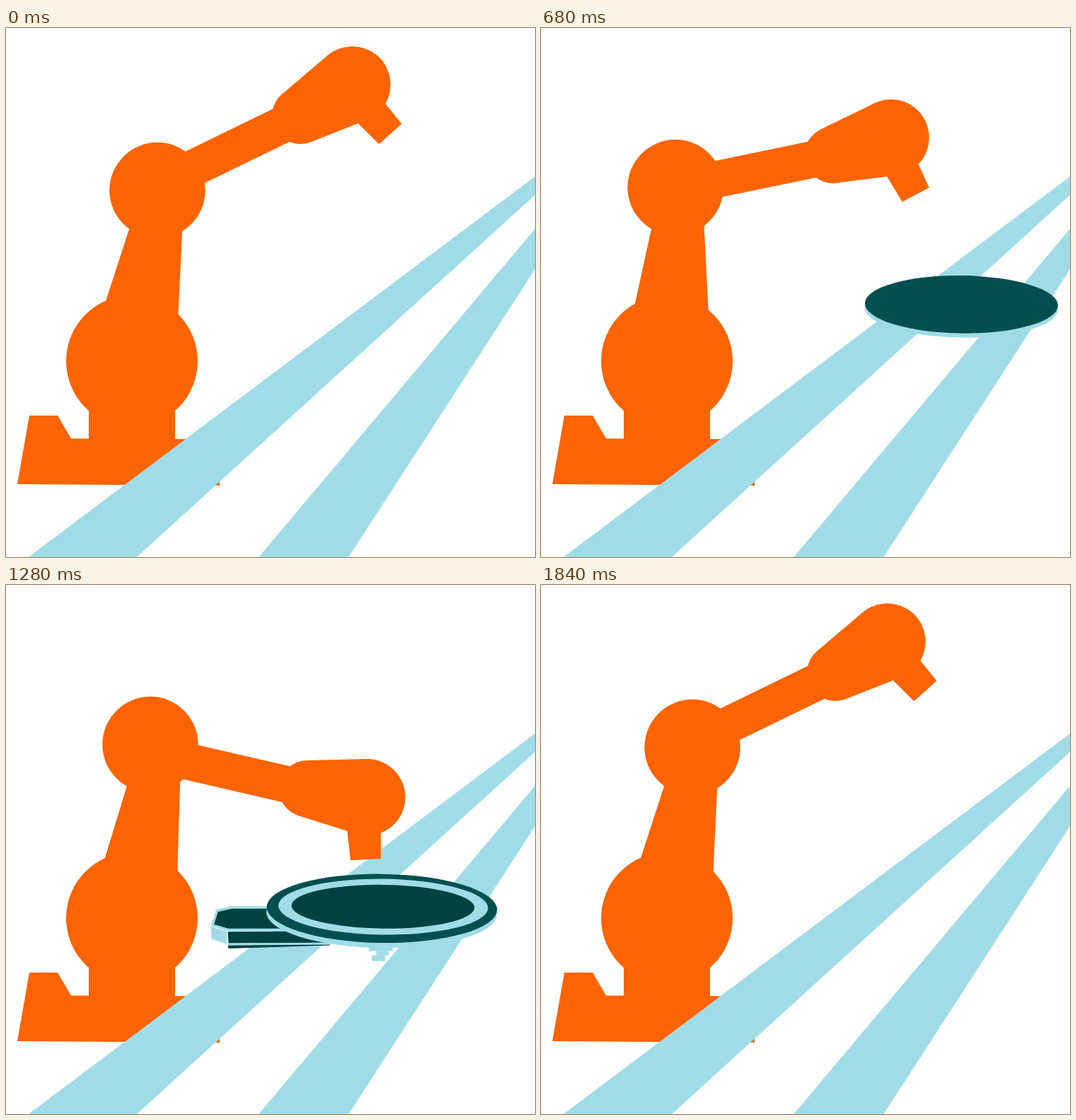
Write an HTML page with a canvas that moves like this. It is 748 px wide and 748 px high and loops after 1960 ms.

```html
<!DOCTYPE html>
<html lang="en">
<head>
<meta charset="utf-8">
<title>Robot arm at a conveyor</title>
<style>
html, body { margin: 0; width: 100%; height: 100%; overflow: hidden; background: #fff; }
canvas { display: block; }
</style>
</head>
<body>
<canvas id="stage" width="748" height="748"></canvas>
<script>
const ctx = document.getElementById('stage').getContext('2d');
const SIZE = 748, LOOP = 1960, STEP = 40;
const ORANGE = '#fb6400', LIGHT = '#a0dce6', DARK = '#004f4f', DEEP = '#004141';

function paint(path, color, alpha = 1) {
  ctx.globalAlpha = alpha;
  ctx.fillStyle = color;
  ctx.fill(path);
  ctx.globalAlpha = 1;
}

const poly = points => new Path2D('M' + points + 'Z');

function circle(x, y, r) {
  const path = new Path2D();
  path.arc(x, y, r, 0, 2 * Math.PI);
  paint(path, ORANGE);
}

// A straight limb whose width changes from one end to the other.
function limb(x0, y0, w0, x1, y1, w1) {
  const length = Math.hypot(x1 - x0, y1 - y0);
  const nx = (y0 - y1) / length / 2, ny = (x1 - x0) / length / 2;
  const corner = (x, y, w) => [x + nx * w, y + ny * w];
  paint(poly([corner(x0, y0, w0), corner(x1, y1, w1), corner(x1, y1, -w1), corner(x0, y0, -w0)].join(' ')), ORANGE);
}

// Two circles joined by their outer tangents.
function hull(x0, y0, r0, x1, y1, r1) {
  const axis = Math.atan2(y1 - y0, x1 - x0);
  const spread = Math.acos((r0 - r1) / Math.hypot(x1 - x0, y1 - y0));
  const touch = (x, y, r, side) => {
    const a = axis + side * spread;
    return [x + r * Math.cos(a), y + r * Math.sin(a)];
  };
  circle(x0, y0, r0);
  circle(x1, y1, r1);
  paint(poly([touch(x0, y0, r0, 1), touch(x1, y1, r1, 1), touch(x1, y1, r1, -1), touch(x0, y0, r0, -1)].join(' ')), ORANGE);
}

// Draws with the scene turned about the point (fromX, fromY), which lands on (x, y).
function turned(x, y, degrees, fromX, fromY, draw) {
  ctx.save();
  ctx.translate(x, y);
  ctx.rotate(degrees * Math.PI / 180);
  ctx.translate(-fromX, -fromY);
  draw();
  ctx.restore();
}

function ease(t, start, end) {
  const u = Math.min(1, Math.max(0, (t - start) / (end - start)));
  return (1 - Math.cos(Math.PI * u)) / 2;
}

// A rail of the conveyor running to its vanishing point.
const rail = (left, right, x, y) => paint(poly(`${left},${SIZE} ${x},${y} ${right},${SIZE}`), LIGHT);

function drawScene() {
  ctx.fillStyle = '#fff';
  ctx.fillRect(0, 0, SIZE, SIZE);
  paint(poly('16,645 33,548 73,548 92,580.5 302,581.5 302,647'), ORANGE);
  ctx.fillRect(117, 500, 122, 100);
  rail(32, 185, 912.5, 86.4);
  rail(357.5, 484.5, 908, 94);
}

function drawArm(t) {
  const back = ease(t, 20, 360), forth = ease(t, 356, 850), home = ease(t, 1490, 1820);
  const x = 214 - 62.5 * back + 52.5 * forth + 10 * home;
  const y = 229.5 - 4 * back + 4 * home;
  const lean = 0.8 - 16.3 * back + 14.45 * forth + 1.05 * ease(t, 850, 1440) + 0.8 * ease(t, 1440, 1840);
  const reach = -26.8 + 0.7 * ease(t, 20, 400) + 40.4 * ease(t, 440, 1051) - 41.1 * ease(t, 1186, 1820);

  circle(178, 471, 93);
  turned(178, 471, lean, 178, 471, () => limb(217.4, 240, 62, 182, 450, 119));
  circle(x, y, 67.7);
  turned(x - 26, y + 6.3, reach, 178, 232, () => {
    limb(204, 232, 52, 432, 235.5, 52);
    hull(432, 235, 40, 517.5, 229, 54);
    limb(515.8, 248.5, 50.6, 534, 315.5, 43);
  });
}

function ellipse(x, y, rx, ry, color, alpha) {
  const path = new Path2D();
  path.ellipse(x, y, rx, ry, 0.012, 0, 2 * Math.PI);
  paint(path, color, alpha);
}

function drawHandle(fade) {
  const top = poly('213.5,536 221,513 244,508 330,508 330,543.5 239,543.5');
  paint(top, DEEP, 1 - (1 - fade) ** 3);
  if (fade < 1) return;

  ctx.strokeStyle = LIGHT;
  ctx.lineWidth = 4;
  ctx.stroke(top);
  paint(poly('211,538 237,546.5 236,566 212,558'), LIGHT);

  const band = (y, near, far, color) =>
    paint(poly(`238,${y} 400,${y - 1} 400,${y - 1 + far} 239,${y + near}`), color);
  band(546.5, 18, 18, DEEP);
  band(565, 2.5, 2.5, LIGHT);
  band(568, 5, 1, DEEP);

  ctx.fillStyle = LIGHT;
  ctx.fillRect(461, 566, 38, 11);
  ctx.fillRect(473, 577, 20, 7);
  ctx.fillRect(466, 584, 21, 9);
}

function drawDisc(t) {
  if (t <= 480 || t >= 1840) return;
  // Slows to a stop under the arm, then speeds up towards the viewer.
  const shift = t < 850 ? -270 * ((850 - t) / 370) ** 2
                        : 55.5 * (Math.max(0, t - 1202) / 238) ** 2;
  const scale = (1 + 0.002543 * shift - 1.336e-6 * shift ** 2) / 1.137;
  const fade = Math.min(1, Math.max(0, (t - 1080) / 104));

  ctx.save();
  ctx.translate(537.5 - shift, 451 + 1.055 * shift);
  ctx.scale(scale, scale);
  ctx.translate(-482, -509.5);
  if (fade > 0) drawHandle(fade);
  ellipse(481.5, 517.5, 182.5, 54.5, LIGHT, 1);
  ellipse(482, 509.5, 182.5, 54.5, DARK, 1);
  ellipse(484, 507, 166, 44.2, LIGHT, fade);
  ellipse(483.7, 506.7, 145, 34.6, DEEP, fade);
  ctx.restore();
}

function frame(now) {
  const t = Math.floor((now % LOOP) / STEP) * STEP;
  drawScene();
  drawArm(t);
  drawDisc(t);
  requestAnimationFrame(frame);
}

frame(0);
</script>
</body>
</html>
```
